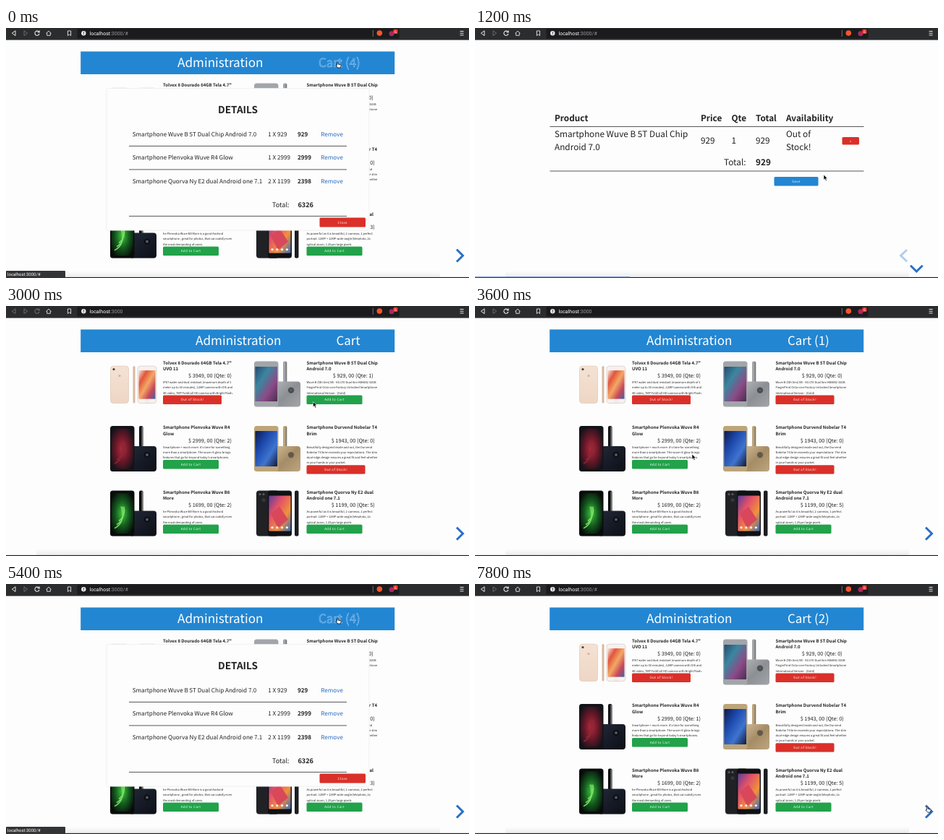
Recreate the animation shown at these times as an HTML page. Size 640 by 346 pixels, loop 8 s.

```html
<!DOCTYPE html>
<html lang="en">
<head>
<meta charset="utf-8">
<title>Shop</title>
<style>
  html, body { margin: 0; height: 100%; overflow: hidden; background: #fdfdfd; }
  svg { display: block; width: 100vw; height: 100vh; }
  text { font-family: "Noto Sans CJK JP", "Noto Sans CJK SC", "Noto Sans CJK", sans-serif; fill: #222; text-rendering: geometricPrecision; white-space: pre; }
  .bold { font-weight: 700; }
  .mid { text-anchor: middle; }
  .white { fill: #fff; }
  .link { fill: #2a6cc0; }
  .hover { fill: #3f95da; stroke: #b4d8f7; stroke-width: .6; stroke-dasharray: 1 .6; }
  .button { fill: #fff; text-anchor: middle; letter-spacing: .37px; }
  .ui, .ui tspan { font-family: Roboto, sans-serif; }
</style>
</head>
<body>
<svg id="stage" viewBox="0 0 640 346" preserveAspectRatio="none"></svg>
<script>
const BLUE = '#2386d2', RED = '#da3029', GREEN = '#22a24a', BAR = '#2b2c2e';

const text = (x, y, size, str, cls = '') =>
  `<text x="${x}" y="${y}" font-size="${size}" class="${cls}">${str}</text>`;
const rect = (x, y, w, h, fill, rx = 0, more = '') =>
  `<rect x="${x}" y="${y}" width="${w}" height="${h}" rx="${rx}" fill="${fill}" ${more}/>`;
const circle = (x, y, r, fill, more = '') => `<circle cx="${x}" cy="${y}" r="${r}" fill="${fill}" ${more}/>`;
const path = (d, stroke, width = 1, fill = 'none') =>
  `<path d="${d}" stroke="${stroke}" stroke-width="${width}" fill="${fill}"/>`;
const rule = (x1, x2, y) => path(`M${x1} ${y}H${x2}`, '#444', .9);
const button = (x, y, w, h, fill, label, size = 4.5) =>
  rect(x, y, w, h, fill, 1.5) + text(x + w / 2, y + h / 2 + size * .37, size, label, 'button');

const stops = colors => colors.map((c, i) =>
  `<stop offset="${i / (colors.length - 1)}" stop-color="${c}"/>`).join('');
const linear = (id, direction, ...colors) =>
  `<linearGradient id="${id}" ${direction}>${stops(colors)}</linearGradient>`;
const radial = (id, ...colors) => `<radialGradient id="${id}" r=".62">${stops(colors)}</radialGradient>`;
const DOWN = 'x2="0" y2="1"', SLANT = 'x2="1" y2="1"';
const defs = '<defs>' +
  linear('rose', SLANT, '#f6e6dc', '#e2553c', '#f3a864', '#c8485a', '#3f62a8') +
  linear('blush', DOWN, '#f4e2d4', '#eed6c4') +
  linear('teal', SLANT, '#274a70', '#3b86a0', '#8c4a86', '#4a2c50') +
  radial('ember', '#b02c3e', '#6a1828', '#12131a') +
  linear('dusk', SLANT, '#0c1a48', '#1c48ac', '#3f74d0', '#0f1838') +
  radial('leaf', '#3fc43c', '#155c20', '#060a08') +
  linear('shards', SLANT, '#5a3f9a', '#e2506a', '#f0923c', '#3a6ab8') +
  linear('navy', SLANT, '#232936', '#161b27', '#0d0f15') +
  linear('silver', SLANT, '#b4b6b9', '#8c8f93', '#a3a6a9') +
  linear('gold', SLANT, '#d2bd98', '#a58c66', '#bda680') +
  linear('shade', DOWN, '#fdfdfd', '#ececec') + '</defs>';

// Phone pictures
const phone = (x, y, w, h, body, screen, bezel) =>
  rect(x, y, w, h, body, 3.5) + rect(x + 1.4, y + bezel, w - 2.8, h - 2 * bezel, `url(#${screen})`, .8);
const trio = (x, y, body, screen, back, lens, bezel) =>
  rect(x + 40, y, 5.5, 60, body, 2) + rect(x + 43.5, y + 1, 1.5, 56, '#777', .6) +
  rect(x + 27, y + 28, 37, 35, `url(#${back})`, 4) +
  circle(x + 51, y + 40, 4.2, lens) + circle(x + 51, y + 40, 2, '#55585f') +
  phone(x, y, 33.5, 63, body, screen, bezel);
const swirl = (x, y, color) => [0, 1, 2].map(i =>
  path(`M${x + 6 + i * 3} ${y + 52 - i * 5}q${16 - i * 3} -8 ${9 - i} -${30 - i * 5}`, color, 1.4)).join('');
const photos = [
  (x, y) => rect(x + .5, y + 6.5, 25, 51.5, 'url(#blush)', 4, 'stroke="#dcc3b0" stroke-width=".6"') +
    circle(x + 5, y + 11, 1.6, '#4a4040') + circle(x + 13, y + 20, 1.6, '#d0b49e') +
    rect(x + 31.5, y + 6.5, 3, 51.5, '#dcb8a0', 1.5) +
    rect(x + 38, y + 6.5, 26, 51.5, '#f5f2f0', 4, 'stroke="#d8c8bc" stroke-width=".7"') +
    rect(x + 39.5, y + 12.5, 23, 39.5, 'url(#rose)') + circle(x + 51, y + 55, 1.7, '#fff', 'stroke="#caa" stroke-width=".4"'),
  (x, y) => trio(x, y, '#a2a5a9', 'teal', 'silver', '#4a4c50', 7.5),
  (x, y) => trio(x, y, '#121318', 'ember', 'navy', '#0c0e14', 3.5) + swirl(x, y, '#8f2636'),
  (x, y) => trio(x, y, '#bda479', 'dusk', 'gold', '#6a5a44', 7),
  (x, y) => trio(x, y, '#0a0c0c', 'leaf', 'navy', '#0c0e14', 3.5) + swirl(x, y, '#7be066'),
  (x, y) => rect(x + 3, y, 31, 63, '#202124', 4) + circle(x + 8, y + 5, 1.5, '#5a5c60') +
    circle(x + 13, y + 5, 1.5, '#5a5c60') + circle(x + 13, y + 13, 2.6, '#34363a') +
    rect(x + 56, y, 5.5, 63, '#1c1d20', 2) +
    phone(x + 19, y, 33, 63, '#101114', 'shards', 7) +
    path(`M${x + 23} ${y + 32}l12 -10 12 18 -14 12z`, 'none', 0, '#d8485a') +
    [0, 1, 2, 3].map(i => circle(x + 25 + i * 6.8, y + 51, 1.7, '#f4f0ec')).join('')
];

const products = [
  [['Tolvex 8 Dourado 64GB Tela 4.7"', 'UVO 11'], 3949,
    ['IP67 water and dust resistant (maximum depth of 1', 'meter up to 30 minutes), 12MP camera with OIS and', '4K video, 7MP FoldCall HD camera with Bright Flash.']],
  [['Smartphone Wuve B 5T Dual Chip', 'Android 7.0'], 929,
    ['Wuve B (5th Gen) B5 - 4G LTE Dual Sim KB4482 32GB', 'FingerPrint Octa-core Factory Unlocked Smartphone', 'International Version - (Gold)']],
  [['Smartphone Plenvoka Wuve R4', 'Glow'], 2999,
    ['Smartphone + much more: it\'s time for something', 'more than a smartphone. The wuve r4 glow brings', 'features that go far beyond today\'s smartphones.']],
  [['Smartphone Durvend Nobelar T4', 'Brim'], 1943,
    ['Beautifully designed inside and out, the Durvend', 'Nobelar T4 brim exceeds your expectations. The slim', 'dual-edge design ensures a great fit and feel whether', 'in your hands or your pocket.']],
  [['Smartphone Plenvoka Wuve B8', 'More'], 1699,
    ['he Plenvoka Wuve B8 More is a good Android', 'smartphone , great for photos, that can satisfy even', 'the most demanding of users.']],
  [['Smartphone Quorva Ny E2 dual', 'Android one 7.1'], 1199,
    ['As powerful as it is beautiful, 2 cameras, 1 perfect', 'portrait. 12MP + 12MP wide-angle/telephoto, 2x', 'optical zoom, 1.25µm large pixels.']]
];

function card(i, qty, focused) {
  const [title, price, lines] = products[i];
  const right = i % 2, x = right ? 415.5 : 217, y = 80.6 + 89.5 * (i >> 1);
  const top = y + 43 + (lines.length - 3) * 7.2, width = qty ? 77 : 81;
  return photos[i](right ? 343 : 144, y - 4) +
    title.map((line, n) => text(x, y + n * 8.6, 6, line, 'bold')).join('') +
    text(right ? 479.7 : 282, y + 18.6, 7.3, `$ ${price}, 00 (Qte: ${qty})`, 'mid') +
    lines.map((line, n) => text(x, y + 26.4 + n * 7.3, 4, line)).join('') +
    button(x, top, width, 12.3, qty ? GREEN : RED, qty ? 'Add to Cart' : 'Out of Stock!') +
    (focused ? rect(x - .8, top - .8, width + 1.6, 13.9, 'none', 2, 'stroke="#4f8df0" stroke-width="2"') : '');
}

function shop({ count, stock, focus, hover }) {
  return rect(103.2, 32.5, 434, 31.5, BLUE) +
    text(count ? 237 : 262, 54.2, 17.15, 'Administration', 'white') +
    text(count ? 432 : 456.5, 54.2, 16.9, count ? `Cart (${count})` : 'Cart', hover ? 'hover' : 'white') +
    stock.map((qty, i) => card(i, qty, i === focus)).join('') +
    path('M623 306.5L631.5 315L623 323.5', '#2a6fc4', 3);
}

function details(items) {
  const inset = items.length > 2 ? 0 : 3.3, top = 182 - 16.4 * items.length - 49.2;
  const left = 170 + inset, right = 471 - inset;
  const qtyX = 362.3 - inset, sumX = 403 - inset;
  const totalY = top + 63 + 32.5 * items.length;
  let total = 0;
  const rows = items.map(([i, qty], n) => {
    const y = top + 63 + 32.5 * n, sum = qty * products[i][1];
    total += sum;
    return text(left + 4.8, y + 3, 8.1, products[i][0].join(' ')) +
      text(qtyX, y + 3, 8.1, `${qty} X ${products[i][1]}`) +
      text(sumX, y + 3, 8.1, sum, 'bold') + text(435.3 - inset, y + 3, 8.1, 'Remove', 'link') +
      (n < items.length - 1 ? rule(left, right, y + 16.8) : '');
  }).join('');
  return rect(138.8, top, 363.2, totalY + 36 - top, '#fdfdfd', 2, 'stroke="#eee" stroke-width=".8"') +
    text(320.5, top + 34, 13.6, 'DETAILS', 'bold mid') + rows +
    text(368 - inset, totalY + 3.4, 9.1, 'Total:') + text(403.5 - inset, totalY + 3.4, 9.1, total, 'bold') +
    rule(left, right, totalY + 16.3) + button(433.5, totalY + 18.3, 63.5, 13, RED, 'Close');
}

function checkout() {
  const size = 11.8, columns = [110, 312, 354.5, 388, 430];
  const cells = (y, labels, cls) => labels.map((s, i) => text(columns[i], y, size, s, cls)).join('');
  return cells(129, ['Product', 'Price', 'Qte', 'Total', 'Availability'], 'bold') + rule(103.5, 537.5, 136.5) +
    cells(151.3, ['Smartphone Wuve B 5T Dual Chip', '', '', '', 'Out of']) +
    cells(168.6, ['Android 7.0', '', '', '', 'Stock!']) + cells(160.2, ['', 929, 1, 929]) +
    button(507.5, 151, 23.5, 10.5, RED, 'x', 4) +
    text(344, 190.4, size, 'Total:') + text(388, 190.4, size, 929, 'bold') + rule(103.5, 537.5, 198) +
    button(413.5, 206, 61, 12.5, BLUE, 'Save') +
    path('M597 307L588.5 315L597 323', '#b3cdec', 3) + path('M602 328.8L610.3 337L618.6 328.8', '#2a6fc4', 3);
}

function browser({ hash, loading, status, page }) {
  const on = '#e8e8e8', off = '#6a6b6d', nav = loading ? off : on;
  return rect(0, 0, 640, 16.6, BAR) + rect(98.5, 1, 445, 13.4, '#1b1b1d', 1.5) +
    path('M13 3.8V10.6L8.3 7.2z', nav) + path('M25 3.8V10.6L29.7 7.2z', off) +
    path('M45.4 5.2A3.1 3.1 0 1 0 46 8M46.2 3.5V6H43.6', nav, 1.1) +
    path('M55.5 7.4L59 4.2L62.5 7.4M56.7 7V10.3H61.3V7', on, .9) +
    path('M85.4 4V10.6L87.5 8.8L89.6 10.6V4z', on, .9) +
    circle(107.3, 7.2, 3.2, on) + rect(106.9, 5.2, .9, 2.4, BAR) + rect(106.9, 8.2, .9, .9, BAR) +
    `<text x="115.5" y="9.7" font-size="7" class="ui white">localhost<tspan fill="#9a9b9d">:3000${hash ? '/#' : ''}</tspan></text>` +
    rect(506.8, 3, .8, 9, '#88898b') + circle(516.3, 7.1, 3.8, '#f4562c') +
    circle(533, 7.8, 3.5, '#a8285f') + rect(535.2, 1.8, 6.4, 6.2, '#e8342c', 1.5) +
    text(538.4, 6.8, 5, 6, 'ui white mid') +
    [4.5, 7.2, 9.9].map(y => rect(627.6, y - .5, 5, 1, on)).join('') +
    rect(42, 336, 558, 9, 'url(#shade)', 3) + rect(0, 344.4, 640, .6, '#bbb') + rect(0, 345, 640, 1, '#222') +
    (page === 'checkout' ? rect(0, 344.4, 214, 1.6, '#2a56c8') : '') +
    (status ? rect(0, 336, 82, 10, '#333436', 1) + text(2, 343.4, 6, 'localhost:3000/#', 'ui white') : '');
}

const cursors = {
  arrow: path('M0 0V7.2L1.7 5.7L2.9 8.4L4.2 7.8L3 5.2H5.2z', '#fff', .6, '#000'),
  hand: path('M0 0.6Q.8 -.4 1.5 .6V3L5 3.9Q5.8 4.2 5.6 5.4L4.8 8H1.3L-1.5 5Q-1.4 3.8 0 4.6z', '#111', .8, '#fff'),
  beam: path('M-1.5 -3.5Q0 -3.5 0 -2.5Q0 -3.5 1.5 -3.5M0 -2.5V2.5M-1.5 3.5Q0 3.5 0 2.5Q0 3.5 1.5 3.5', '#111', .8)
};

// Scenes, one per step
const fresh = [0, 1, 2, 0, 2, 5], one = [0, 0, 2, 0, 2, 5], two = [0, 0, 1, 0, 2, 5], four = [0, 0, 1, 0, 2, 3];
const pair = [[1, 1], [2, 1]], triple = [...pair, [5, 2]];
const adding = { count: 2, stock: two, focus: 2, cursor: ['beam', 417.5, 298] };
const filled = { count: 4, stock: four, focus: 5, cursor: ['arrow', 459.5, 58.5] };
const opened = { count: 4, stock: four, hash: true, status: true, hover: true, items: triple, cursor: ['hand', 457.5, 47] };
const closed = { count: 2, stock: two, hash: true, cursor: ['hand', 624.5, 308] };
const scenes = [
  opened,
  closed,
  { page: 'checkout', hash: true, cursor: ['arrow', 482, 203] },
  adding,
  filled,
  { stock: fresh, loading: true, cursor: ['arrow', 424.5, 132.5] },
  { count: 1, stock: one, cursor: ['arrow', 300, 205] },
  adding,
  filled,
  opened,
  { ...opened, hover: false, cursor: ['hand', 454, 210] },
  { ...closed, items: pair, cursor: ['arrow', 454, 243] },
  { ...closed, cursor: ['arrow', 540, 275] },
  closed
];

const stage = document.getElementById('stage');
let shown = -1;
function frame() {
  const step = Math.floor(performance.now() % 8000 / 600);
  if (step !== shown) {
    const scene = scenes[shown = step], [kind, x, y] = scene.cursor;
    stage.innerHTML = defs + rect(0, 0, 640, 346, '#fdfdfd') + browser(scene) +
      (scene.page === 'checkout' ? checkout() : shop(scene)) +
      (scene.items ? details(scene.items) : '') +
      `<g transform="translate(${x} ${y})">${cursors[kind]}</g>`;
  }
  requestAnimationFrame(frame);
}
frame();
</script>
</body>
</html>
```
